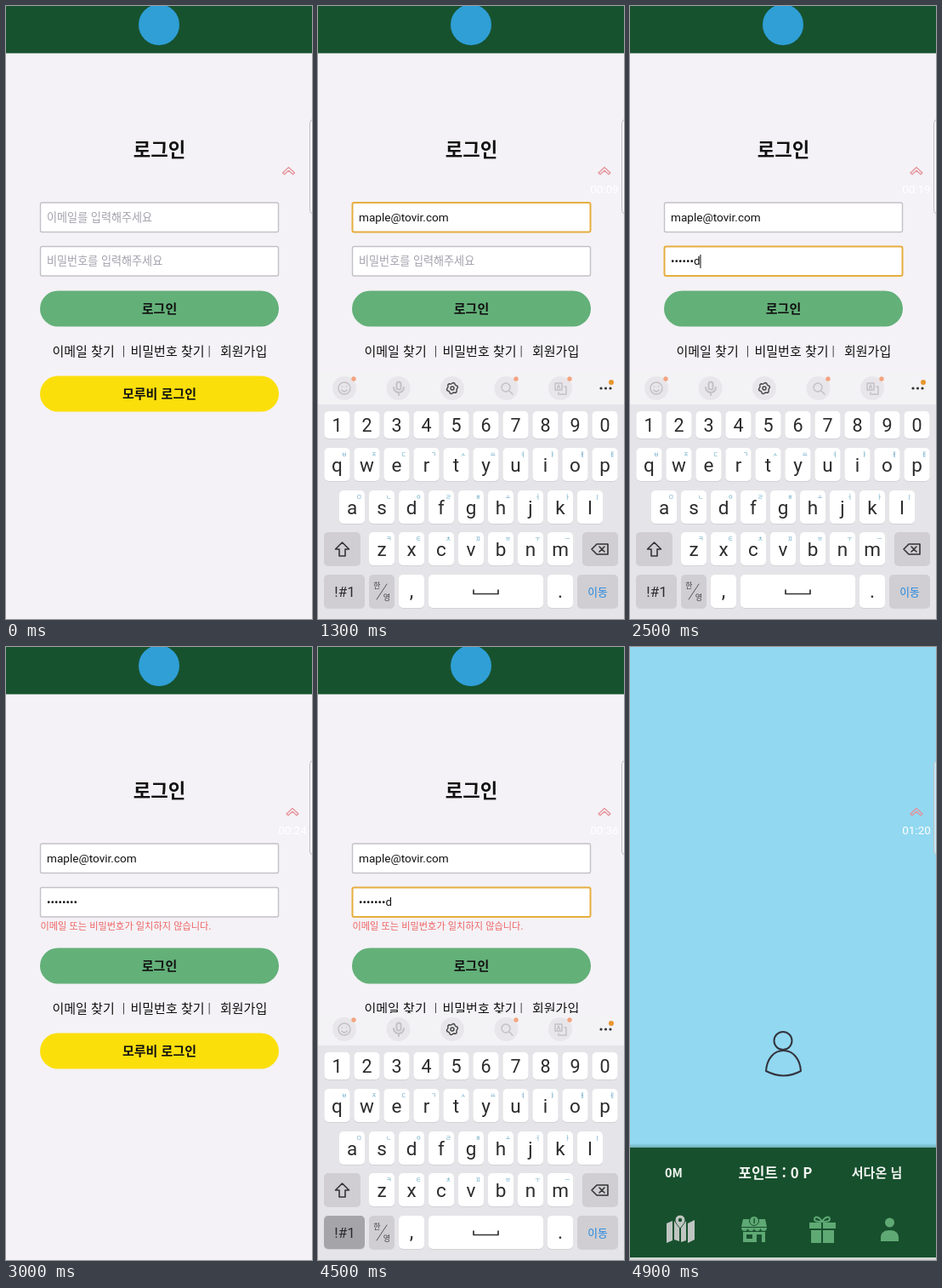
Recreate the animation shown at these times as an HTML page. Size 360 px wide and 720 px high, loop 5 s.

```html
<!DOCTYPE html>
<html lang="ko">
<head>
<meta charset="utf-8">
<style>
html, body { margin: 0; width: 100%; height: 100%; overflow: hidden; background: #f4f2f6; }
svg { display: block; width: 360px; height: 720px; }
text { font-family: 'Noto Sans CJK KR', 'Noto Sans CJK', sans-serif; fill: #111; }
.r { font-family: Roboto, 'Noto Sans CJK KR', sans-serif; }
.b { font-weight: 700; }
.med { font-weight: 500; }
.m { text-anchor: middle; }
.h { fill: #a3a1ac; }
.w { fill: #f4f7f4; }
.line { fill: none; stroke-linecap: round; stroke-linejoin: round; }
</style>
</head>
<body>
<svg id="stage" viewBox="0 0 360 720">
  <defs>
    <filter id="soft" x="-20%" y="-20%" width="140%" height="150%">
      <feDropShadow dx="0" dy="1" stdDeviation="2" flood-opacity=".2"/>
    </filter>
    <linearGradient id="edge" x2="0" y2="1">
      <stop offset="0" stop-color="#16502d" stop-opacity="0"/>
      <stop offset="1" stop-color="#16502d" stop-opacity=".3"/>
    </linearGradient>
  </defs>

  <g id="login">
    <rect width="360" height="720" fill="#f4f2f6"/>
    <rect width="360" height="55.5" fill="#17522e"/>
    <circle cx="180" cy="22" r="24" fill="#2f9fd6"/>
    <text class="b m" x="180.5" y="177" font-size="22.3">로그인</text>

    <rect id="mailBox" x="40.5" y="231" width="280" height="34.5" rx="2" fill="#fff"/>
    <text id="mailHint" class="h" x="48" y="252.5" font-size="13.1">이메일를 입력해주세요</text>
    <text id="mail" class="r" x="48" y="252.5" font-size="13.6">maple@tovir.com</text>

    <rect id="passBox" x="40.5" y="282.5" width="280" height="34.5" rx="2" fill="#fff"/>
    <text id="passHint" class="h" x="48" y="304" font-size="13.1">비밀번호를 입력해주세요</text>
    <text id="pass" class="r" x="48" y="304" font-size="13.3"></text>
    <path id="caret" d="M0 292v16" stroke="#333" stroke-width="1.2"/>
    <text id="error" class="med" x="40.5" y="332" font-size="11.2" style="fill:#ee6464">이메일 또는 비밀번호가 일치하지 않습니다.</text>

    <g id="lower">
      <rect x="40" y="334.5" width="281" height="42" rx="21" fill="#63b079"/>
      <text class="b m" x="180.5" y="360.5" font-size="15">로그인</text>
      <g class="med" font-size="15">
        <text x="54.5" y="410.5">이메일 찾기</text>
        <text class="m" x="138.5" y="409" font-size="12">|</text>
        <text x="146.5" y="410.5">비밀번호 찾기</text>
        <text class="m" x="239" y="409" font-size="12">|</text>
        <text x="252" y="410.5">회원가입</text>
      </g>
      <rect x="40" y="434.5" width="281" height="42" rx="21" fill="#fbdf0b"/>
      <text class="b m" x="180.5" y="460.5" font-size="15">모루비 로그인</text>
    </g>

    <g id="paste">
      <rect x="14" y="198" width="76" height="42" rx="2" fill="#fff" filter="url(#soft)"/>
      <text class="m med" x="52" y="224" font-size="13">붙여넣기</text>
      <path d="M48 256.5l6 5a8.6 8.6 0 1 1-12 0z" fill="#1b8c93"/>
    </g>
    <g id="keys"></g>
  </g>

  <g id="home">
    <rect width="360" height="720" fill="#92d8f1"/>
    <g class="line" stroke="#33343d" stroke-width="2">
      <circle cx="180" cy="462.5" r="10.5"/>
      <path d="M160 498C161 484 169 474 180.5 474S200 484 201 498Q181 509 160 498z"/>
    </g>
    <rect y="583" width="360" height="5" fill="url(#edge)"/>
    <rect y="588" width="360" height="129" fill="#17502d"/>
    <rect y="717" width="360" height="3" fill="#d4d8d6"/>
    <text class="b w" x="41" y="623" font-size="14.5">0M</text>
    <text class="b w m" x="171" y="624" font-size="16.8">포인트 : 0 P</text>
    <text class="b w m" x="290.5" y="623" font-size="15">서다온 님</text>

    <g fill="#bfc5c1">
      <path d="M43 677l7-3v23l-7 3zM52 674l6 7v17l-6-2zM60 681l6-7v23l-6 2zM68 677l8-4v23l-8 4z"/>
      <path d="M59 683c-4-5-6-7-6-10a6 6 0 0 1 12 0c0 3-2 5-6 10z" stroke="#17502d"/>
      <circle cx="59" cy="673" r="2.2" fill="#17502d"/>
    </g>
    <g fill="#5fa974">
      <path d="M133 672h26l2 9h-30z"/>
      <path d="M131 682h30a3.7 4 0 0 1-7.5 0 3.7 4 0 0 1-7.5 0 3.7 4 0 0 1-7.5 0 3.7 4 0 0 1-7.5 0z"/>
      <path d="M133 687h26v12h-26z"/>
      <circle cx="146" cy="674" r="5.5" stroke="#17502d"/>
      <path d="M137 690h7v5h-7zM149 690h6v9h-6zM145.5 671h1.4v6h-1.4z" fill="#17502d"/>
      <path d="M211 676h14v7h-14zM227 676h15v7h-15zM213 685h12v15h-12zM227 685h13v15h-13z"/>
      <path class="line" d="M226 675c-3-6-9-7-9-3 0 3 4 3 9 3 5 0 9 0 9-3 0-4-6-3-9 3z" stroke="#5fa974" stroke-width="2"/>
      <circle cx="305.5" cy="676" r="5.5"/>
      <path d="M295 698v-4c0-6 4-9 10.5-9s10.5 3 10.5 9v4z"/>
    </g>
  </g>

  <rect x="357.5" y="133.5" width="12" height="110.5" rx="4" fill="#fff" fill-opacity=".45" stroke="#bfbcbf"/>
  <g id="widget">
    <path class="line" d="M325.5 196l7-6.5 7 6.5-2 1.8-5-4.5-5 4.5z" stroke="#e58f97" stroke-width="1.2"/>
    <text id="clock" class="r m" x="332.5" y="220" font-size="13.5" style="fill:#fff"></text>
  </g>
</svg>

<script>
const $ = id => document.getElementById(id);
const show = (id, on) => $(id).style.display = on ? '' : 'none';
const GREY = '#d0ced2';

const label = (s, x, y, size, color = '#2c2c2e', cls = 'r m') =>
  `<text class="${cls}" x="${x}" y="${y}" font-size="${size}" style="fill:${color}">${s}</text>`;
const key = (x, y, w, h, fill = '#fff', id = '') =>
  `<rect x="${x}" y="${y + 1}" width="${w}" height="${h}" rx="5" fill="#d3d1d6"/>
   <rect ${id && `id="${id}"`} x="${x}" y="${y}" width="${w}" height="${h}" rx="5" fill="${fill}"/>`;
const stroke = (d, color, w = 1.5) =>
  `<path class="line" d="${d}" stroke="${color}" stroke-width="${w}"/>`;
const dot = (x, y, r, fill) => `<circle cx="${x}" cy="${y}" r="${r}" fill="${fill}"/>`;

function keyboard() {
  let s = '<rect y="430" width="360" height="290" fill="#f3f2f5"/><rect y="468" width="360" height="252" fill="#e5e4e8"/>';

  // toolbar
  for (let i = 0; i < 5; i++) s += dot(31 + 63.5 * i, 449, 14, '#e8e6ea');
  const pale = '#c3c1c6';
  s += stroke('M38 449a7 7 0 1 1-14 0 7 7 0 1 1 14 0M28 451q3 4 6 0M28.5 447v.1M33.5 447v.1', pale);
  s += stroke('M92.5 444a2.5 2.5 0 0 1 5 0v4a2.5 2.5 0 0 1-5 0zM89 448a6 6 0 0 0 12 0M95 454v3', pale, 2);
  let gear = '';
  for (let i = 0; i < 24; i++) {
    const a = i * Math.PI / 12 + Math.PI / 24, r = i % 4 < 2 ? 5.4 : 6.6;
    gear += (i ? 'L' : 'M') + (158 + r * Math.cos(a)).toFixed(1) + ' ' + (449 + r * Math.sin(a)).toFixed(1);
  }
  s += stroke(gear + 'zM160 449a2 2 0 1 1-4 0 2 2 0 1 1 4 0', '#444', 1.4);
  s += stroke('M226 448a5 5 0 1 1-10 0 5 5 0 1 1 10 0M225 452l4 4', pale);
  s += stroke('M279 443h8v8h-8zM290 447h2v9h-9v-2M281.5 449l1.5-4 1.5 4', pale);
  for (const x of [42, 233, 296]) s += dot(x, 438, 2.7, '#f3a57f');
  for (const x of [333, 338.5, 344]) s += dot(x, 449, 1.6, '#333');
  s += dot(345, 442, 3, '#e8962f');

  // character rows
  const rows = [
    ['1234567890', '', 22.5, 476, 32],
    ['qwertyuiop', 'ㅂㅈㄷㄱㅅㅛㅕㅑㅐㅔ', 22.5, 519, 39],
    ['asdfghjkl', 'ㅁㄴㅇㄹㅎㅗㅓㅏㅣ', 40, 569, 39],
    ['zxcvbnm', 'ㅋㅌㅊㅍㅠㅜㅡ', 75, 618, 39]
  ];
  for (const [chars, jamo, x0, y, h] of rows)
    [...chars].forEach((c, i) => {
      const x = x0 + 35 * i;
      s += key(x - 15, y, 30, h) + label(c, x, y + h / 2 + 8, jamo ? 22.5 : 21.5);
      if (jamo) s += label(jamo[i], x + 8.5, y + 9.5, 6.8, '#5aa0c0', 'm med');
    });

  // function keys
  s += key(7, 618, 43, 39, GREY) + stroke('M28.5 630l8 8h-4.5v8h-7v-8h-4.5z', '#333', 1.6);
  s += key(311, 618, 42, 39, GREY) + stroke('M328 632h13v12h-13l-6-6zM331 635l6 6M337 635l-6 6', '#333', 1.6);
  s += key(7, 668, 48, 39, GREY, 'sym') + label('!#1', 31.5, 694, 17);
  s += key(60, 668, 30, 39, GREY) + label('한', 69.5, 684, 9, '#444', 'm') + label('영', 81, 698, 9, '#444', 'm') + stroke('M69 697l12-18', '#555', 1);
  s += key(95, 668, 30, 39) + label(',', 110, 695, 23);
  s += key(130, 668, 135, 39) + stroke('M183 686v4.5h29v-4.5', '#333', 1.7);
  s += key(270, 668, 30, 39) + label('.', 285, 695, 23);
  s += key(305, 668, 48, 39, GREY) + label('이동', 329, 692.5, 12.8, '#2489e0', 'm med');
  return s;
}
$('keys').innerHTML = keyboard();

// Password text; the newest character stays readable while typing
const masked = (word, n) => '•'.repeat(n - 1) + word[n - 1];

function password(t) {
  if (t < 1900) return '';
  if (t < 2700) return masked('asdfasdf', (t - 1800) / 100);
  if (t < 3300) return '•'.repeat(8);
  if (t < 3600) return '•'.repeat(8 - Math.floor((t - 3200) / 50));
  if (t < 3700) return '';
  if (t < 3800) return 'a';
  if (t < 4600) return masked('asdfassd', 2 + Math.floor((t - 3800) * 6 / 700));
  return '•'.repeat(9);
}

function border(id, on) {
  $(id).setAttribute('stroke', on ? '#e6ae40' : '#c3c1c8');
  $(id).setAttribute('stroke-width', on ? 2 : 1.4);
}

function draw(t) {
  const within = (a, b) => t >= a && t < b;
  const home = t >= 4900, filled = t >= 1300, failed = t >= 2900;
  const typing = within(1600, 2700) || within(3100, 4800);
  const word = password(t);

  show('login', !home);
  show('home', home);
  show('mail', filled);
  show('mailHint', !filled);
  border('mailBox', within(700, 1600));
  border('passBox', typing);
  show('paste', within(800, 1300));
  show('keys', within(1300, 2700) || within(3200, 4800));
  $('sym').setAttribute('fill', within(4500, 4600) ? '#a5a4a8' : GREY);

  $('pass').textContent = word;
  show('passHint', !word);
  show('caret', typing && t !== 4500);
  if (!home) {
    const end = word ? $('pass').getComputedTextLength() : 0;
    $('caret').setAttribute('transform', `translate(${48.5 + end})`);
  }
  show('error', failed);
  $('lower').setAttribute('transform', `translate(0 ${failed ? 19 : 0})`);

  const sec = home ? 80 : Math.max(0, Math.round(t * 0.0085 - 2));
  $('clock').textContent = `0${Math.floor(sec / 60)}:${String(sec % 60).padStart(2, '0')}`;
  show('clock', t >= 300);
  $('widget').setAttribute('transform', `translate(${Math.min(4.5, t * 0.015)})`);
}

const start = performance.now();
function tick() {
  const t = (performance.now() - start) % 5000;
  draw(Math.floor(t / 100) * 100);
  requestAnimationFrame(tick);
}
tick();
</script>
</body>
</html>
```
